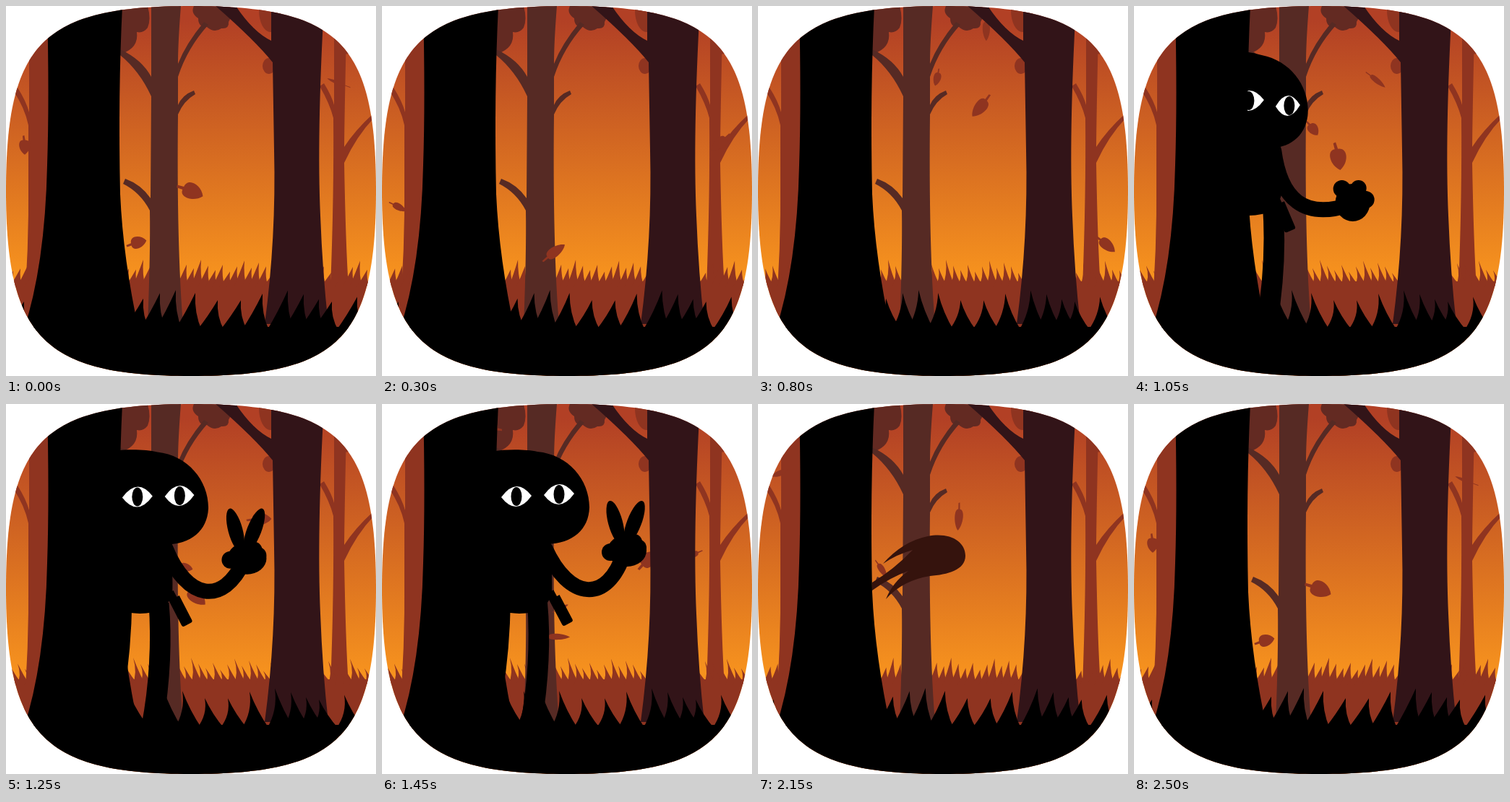
Recreate the animation shown at these times as an HTML page with a canvas. Size 512 by 512 pixels, loop 2.55 s.

```html
<!DOCTYPE html>
<html>
<head>
<meta charset="utf-8">
<style>
html, body { margin: 0; width: 100%; height: 100%; overflow: hidden; background: #fff; }
canvas { display: block; width: 512px; height: 512px; }
</style>
</head>
<body>
<canvas id="stage" width="512" height="512"></canvas>
<script>
const ctx = document.getElementById('stage').getContext('2d');
const LOOP = 2550, STEP = 50, CYCLE = 2500;
const FAR = '#8f3420', MID = '#562a24', NEAR = '#321418', SMEAR = '#35130d', BLACK = '#000';

const shape = d => new Path2D(d);
const frame = shape('M0 256C0 51 51 0 256 0S512 51 512 256 459 512 256 512 0 459 0 256Z');
const sky = ctx.createLinearGradient(0, 20, 0, 375);
sky.addColorStop(0, '#b24025');
sky.addColorStop(1, '#f7931e');

const farTrees = shape(`M32 0H62V430H24Q32 340 31 240V165Q26 141 10 117L16 113Q28 132 32 147Z
  M454 0H472Q469 110 468 195Q483 172 507 150L509 155Q485 180 468 217Q470 330 474 390H449Q454 260 453 155Q448 135 434 111L440 107Q451 125 454 137Z
  M440 30Q462 20 474 40V66Q456 70 454 45Z`);
const midTree = shape(`M201 0H242Q238 50 238 80Q249 52 274 22L280 26Q251 58 238 98V137Q244 123 260 117L262 122Q246 131 238 150Q236 330 245 442H196Q200 340 199 283Q186 258 162 246L165 239Q187 247 200 266L201 125Q185 90 158 68V60Q188 74 201 98Z`);
const foliage = shape(`M156 0H196Q201 18 196 30Q190 38 181 36Q184 58 160 66H156Z
  M260 0H310Q316 10 308 22Q309 32 298 31Q288 38 278 29Q266 30 266 17Q255 10 260 0Z`);
const nearTree = shape(`M290 0H318Q342 36 367 48V0H440Q430 180 435 290Q438 370 446 440H358Q374 320 371 200L369 78Q345 48 290 0Z`);
const blackTree = shape(`M57 0H161Q155 120 158 260Q162 350 184 450H24Q54 360 57 220Q60 130 57 0Z`);
const leaf = shape('M0 18C-15 9-17-13-4-13L-5-22-1-23 1-13C17-13 15 9 0 18Z');
const bulge = shape('M400 258H373C352 244 335 262 340 282C343 303 359 322 368 342L400 340Z');
const comet = shape(`M173 221Q200 190 235 183C265 177 287 190 287 210C287 230 262 236 238 238
  Q200 244 177 270Q186 247 208 231Q183 240 158 258V247Q188 229 214 202Q192 208 173 221Z`);
const head = shape('M60 66H150C175 62 200 63 215 66C258 70 287 105 287 143C286 174 264 193 228 194L130 200Z');
const body = shape('M60 150H216L232 193Q236 225 235 262Q228 285 208 288Q185 293 160 285H60Z');
const legs = shape('M130 270H178Q177 340 167 400H130ZM201 275H229Q236 350 221 445H191Q207 360 201 275Z');
const gun = shape('M-8-26H4V-16H8V22Q8 25 5 25H-5Q-8 25-8 22Z');

// One moment of each fall; all leaves share the same speed, spin and flutter.
const leaves = [
  { at: 2500, x: 257, y: 256, drift: -.06, angle: -65, size: .95 },
  { at: 2500, x: 182, y: 327, drift: .03, angle: -102, size: .7 },
  { at: 0, x: 26, y: 194, drift: -.01, angle: 0, size: .65 },
  { at: 550, x: 475, y: 260, drift: .03, angle: 2, size: .85 },
  { at: 1050, x: 283, y: 210, drift: -.1, angle: -8, size: .95 },
  { at: 1050, x: 248, y: 170, drift: 0, angle: -35, size: .6 },
  { at: 1450, x: 368, y: 215, drift: .08, angle: -130, size: .85 },
  { at: 1800, x: 450, y: 307, drift: .06, angle: 0, size: .7 }
];
const bladeTips = [25, 190, 213, 235, 262, 293, 325, 355, 390, 412, 433, 451, 486];

const mix = (a, b, u) => a + (b - a) * u;
const clamp = v => Math.max(0, Math.min(1, v));

function fill(path, color, x = 0, y = 0, angle = 0, sx = 1, sy = sx) {
  ctx.save();
  ctx.translate(x, y);
  ctx.rotate(angle * Math.PI / 180);
  ctx.scale(sx, sy);
  ctx.fillStyle = color;
  ctx.fill(path);
  ctx.restore();
}

function oval(x, y, rx, ry = rx, angle = 0, color = BLACK) {
  ctx.fillStyle = color;
  ctx.beginPath();
  ctx.ellipse(x, y, rx, ry, angle * Math.PI / 180, 0, 7);
  ctx.fill();
}

function clipColumns(left, right, paint) {
  ctx.save();
  ctx.beginPath();
  ctx.rect(left, 0, right - left, 512);
  ctx.clip();
  paint();
  ctx.restore();
}

function blade(x, base, width, tipX, tipY, color) {
  const bend = mix(tipY, base, .55);
  ctx.fillStyle = color;
  ctx.beginPath();
  ctx.moveTo(x - width, base);
  ctx.quadraticCurveTo(x - width * .2, bend, tipX, tipY);
  ctx.quadraticCurveTo(mix(x + width * .4, tipX, .3), bend, x + width, base);
  ctx.fill();
}

function drawFarGround(sway) {
  ctx.fillStyle = FAR;
  ctx.fillRect(0, 381, 512, 131);
  for (let x = 4; x < 512; x += 10) {
    const y = 360 + 6 * Math.sin(x * .23) + 4 * Math.sin(x * .09);
    blade(x, 389, 9, x - 1 + 7 * sway, y, FAR);
  }
}

function drawLeaves(t) {
  for (const { at, x, y, drift, angle, size } of leaves)
    for (const shift of [-CYCLE, 0, CYCLE]) {
      const age = t + shift - at, top = y + .28 * age;
      const flat = .1 + .85 * Math.abs(Math.cos(age / 318));
      if (top > -25 && top < 355) fill(leaf, FAR, x + drift * age, top, angle - .2 * age, size * flat, size);
    }
}

function drawDash(t) {
  if (t >= 500 && t < 600) fill(bulge, NEAR, (550 - t) * .9);
  if (t >= 600 && t < 750) fill(comet, SMEAR, 530 - (t - 600) * 2.1, 0, 0, -1, 1);
  if (t >= 2100 && t < 2300) fill(comet, SMEAR, (t - 2150) * 1.7);
}

function eye(x, y, w, pupil) {
  fill(shape(`M${-w} 1Q0-28 ${w}-1Q0 28 ${-w} 1Z`), '#fff', x, y);
  oval(x + pupil, y, 7.5, 13);
}

function drawHand(x, y, k) {
  const open = clamp((.7 - k) / .5);
  oval(x, y, mix(24, 27, open), mix(26, 22, open));
  oval(x + mix(-15, -23, open), y + mix(-19, 2, open), 12);
  oval(x + mix(8, 10, open), y + mix(-20, -12, open), 11);
  oval(x + mix(18, 15, open), y - 4, 12);
  if (open) {
    oval(x - 16, y - 11 - 28 * open, 10, 31 * open, -15);
    oval(x + 10, y - 11 - 28 * open, 10, 32 * open, 21);
  }
}

// 0 is fully out, 1 leaning out, 3 behind the tree.
function hiding(t) {
  const drift = .04 * clamp((t - 1450) / 350);
  return 3 * (1 - clamp((t - 850) / 600)) ** 2.7 + 3 * clamp((t - 1900) / 200) ** 2 - drift;
}

function drawFigure(t) {
  const k = hiding(t);
  if (k >= 2.95) return;
  const lean = clamp(k), away = Math.max(0, k - 1) * 88;
  const armX = (out, leaning) => mix(out, leaning, lean) - away;
  const handX = armX(339, 303), handY = mix(203, 272, lean);

  fill(legs, BLACK, -23 * k);
  fill(body, BLACK, -31 * k);
  fill(gun, BLACK, 246 - 39 * k, 282 + 6 * lean, -28 + 5 * lean);

  ctx.strokeStyle = BLACK;
  ctx.lineWidth = 21;
  ctx.lineCap = 'round';
  ctx.beginPath();
  ctx.moveTo(armX(226, 194), 200);
  ctx.bezierCurveTo(armX(259, 203), mix(272, 268, lean), armX(312, 236), mix(277, 296, lean), handX - 4, handY + 3);
  ctx.stroke();
  drawHand(handX, handY, k);

  fill(head, BLACK, -44 * k + 14 * lean, -20 * lean, 6 * lean);
  eye(186 - 27 * k, 128 + 3 * lean, 21, 0);
  eye(245 - 32 * k, 125 + 13 * lean, 21 - 4 * lean, 2 * lean);
}

function drawForeground(sway) {
  fill(blackTree, BLACK);
  ctx.fillStyle = BLACK;
  ctx.fillRect(0, 444, 512, 68);
  for (const x of bladeTips) {
    const root = x - 10;
    blade(root, 449, 19, root + 1 + 9 * sway, 401 + 8 * Math.cos((x - 310) / 23), BLACK);
  }
}

function draw(now) {
  const t = Math.floor(now % LOOP / STEP) * STEP;
  const sway = Math.cos(t / CYCLE * 2 * Math.PI);
  ctx.clearRect(0, 0, 512, 512);
  ctx.save();
  ctx.clip(frame);
  ctx.fillStyle = sky;
  ctx.fillRect(0, 0, 512, 512);
  fill(farTrees, FAR);
  drawFarGround(sway);
  fill(foliage, '#632a22');
  fill(midTree, MID);
  drawLeaves(t);
  clipColumns(100, 410, () => drawDash(t));
  oval(364, 83, 9, 11, 0, FAR);
  oval(366, 6, 16, 30, 0, FAR);
  fill(nearTree, NEAR);
  clipColumns(120, 512, () => drawFigure(t));
  drawForeground(sway);
  ctx.restore();
}

const start = performance.now();
function tick() {
  draw(performance.now() - start);
  requestAnimationFrame(tick);
}
tick();
</script>
</body>
</html>
```
